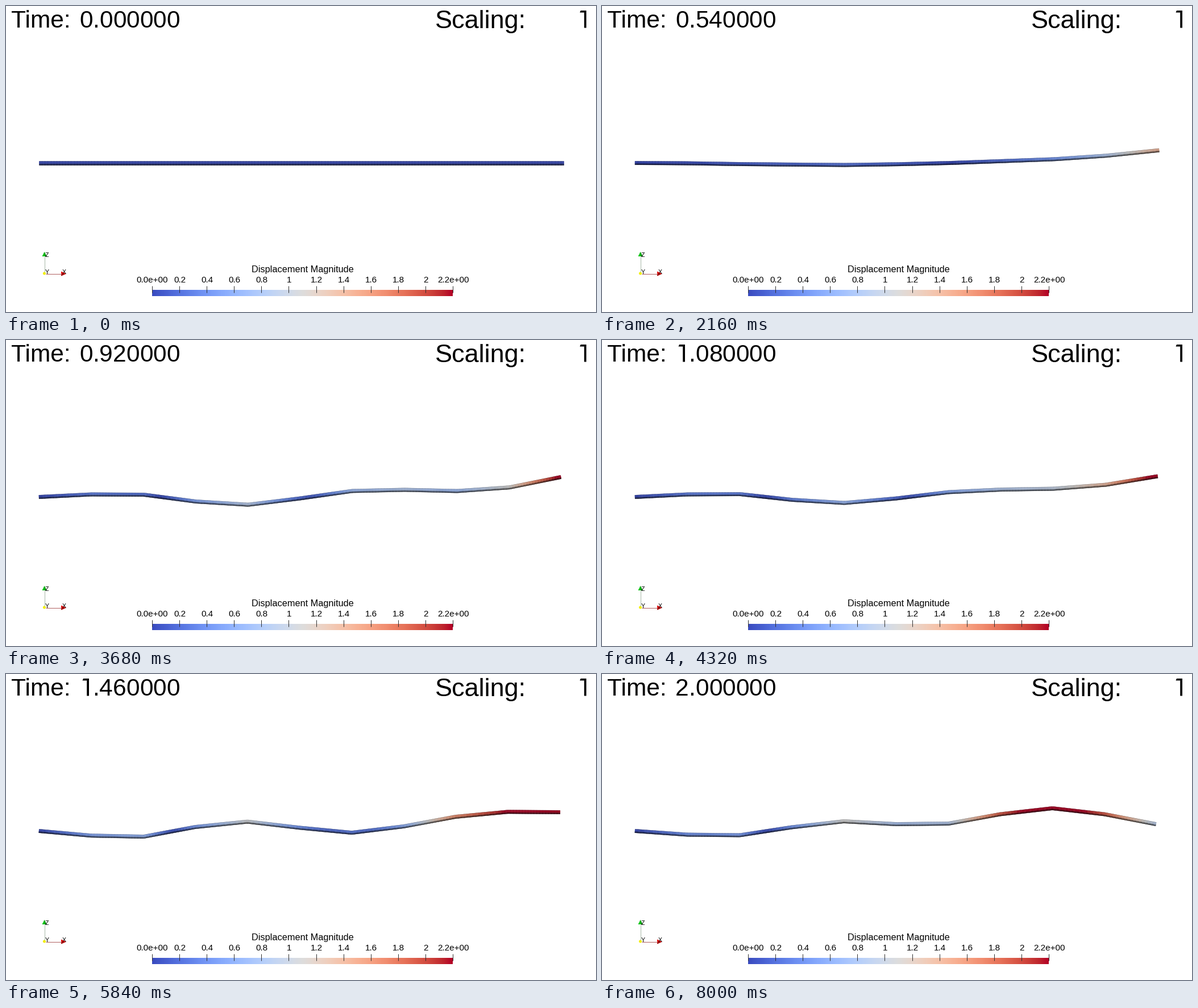
Write a matplotlib script that moves like this. It is 1038 px wide and 539 px high and loops after 8080 ms.

```python
import numpy as np
import matplotlib.pyplot as plt
from matplotlib.animation import FuncAnimation
from matplotlib.collections import PolyCollection
from matplotlib.patches import Circle, Polygon

W, H, DPI = 1038, 539, 64
PX = 72 / DPI          # points per pixel
FRAMES, INTERVAL, DT = 101, 80, 0.02
FONT = "Liberation Sans"

# Beam geometry in pixels
X0, Y0, LENGTH = 58, 276.5, 923
ELEMENTS, PARTS = 10, 18
STEP = LENGTH / ELEMENTS
UNIT = LENGTH / 60     # pixels per unit of displacement
VMAX = 2.2
SHADES = np.array([0.65, 0.84, 0.86, 0.79, 0.67, 0.48, 0.25])
EDGES = np.linspace(-3.2, 3.2, len(SHADES) + 1)

# Node deflections (pixels, downwards) at a few moments
TIMES = np.array([0, 0.32, 0.74, 1.08, 1.26, 1.68, 2.0])
POSES = np.array([
    [0, 0, 0, 0, 0, 0, 0, 0, 0, 0, 0],
    [0, 0.8, 0.5, -3, -2.5, 3.5, 7, 1.5, -6.5, -11, -11.5],
    [0, -0.5, 2, 8, 9.5, 0.8, -7.5, -8.5, -7, -14, -31],
    [0, -4.5, -5, 5, 10.5, 2.5, -8.5, -13, -14.5, -21.5, -36.5],
    [0, 6, 8, -2.5, -8.5, -2.5, 3, -6, -19.5, -31, -35.5],
    [0, 6, 6.5, -8.5, -17, -8, -4, -16.5, -31, -32, -27.5],
    [0, 6.5, 7.5, -6.5, -17, -12, -13, -29.5, -40, -29.5, -12],
])
RATES = np.gradient(POSES, TIMES, axis=0)
RATES[0] = 0

fig = plt.figure(figsize=(W / DPI, H / DPI), dpi=DPI, facecolor="white")
ax = fig.add_axes([0, 0, 1, 1])
ax.set_axis_off()
cmap = plt.get_cmap("coolwarm")


def label(x, y, s, size, ha="left"):
    return ax.text(x, y, s, fontsize=size * PX, family=FONT, color="black",
                   ha=ha, va="baseline")


def line(x, y, color, width=1):
    ax.plot(x, y, color=color, lw=width * PX, solid_capstyle="butt")


def plain_one(x, y):
    """A footless figure one whose stem ends at x, standing on y."""
    pts = [(x, y), (x, y - 30.5), (x - 10, y - 30.5), (x - 11.5, y - 27),
           (x - 3.8, y - 27), (x - 3.8, y)]
    return ax.add_patch(Polygon(pts, fc="black", ec="none"))


def deflection(t):
    """Cubic Hermite interpolation of the node deflections."""
    k = min(np.searchsorted(TIMES, t, side="right") - 1, len(TIMES) - 2)
    h = TIMES[k + 1] - TIMES[k]
    s = (t - TIMES[k]) / h
    return ((1 + 2 * s) * (1 - s) ** 2 * POSES[k]
            + s * (1 - s) ** 2 * h * RATES[k]
            + s * s * (3 - 2 * s) * POSES[k + 1]
            + s * s * (s - 1) * h * RATES[k + 1])


def beam(t):
    """Quads and colours of the tube, one straight piece per element."""
    v = deflection(t)
    dy = np.diff(v)
    dx = np.sqrt(STEP ** 2 - dy ** 2)      # elements keep their length
    x = X0 + np.concatenate([[0], np.cumsum(dx)])
    u = x - (X0 + STEP * np.arange(ELEMENTS + 1))
    quads, colors = [], []
    s = np.linspace(0, 1, PARTS + 1)
    for i in range(ELEMENTS):
        px = x[i] + s * dx[i]
        py = Y0 + v[i] + s * dy[i]
        nx, ny = -dy[i] / STEP, dx[i] / STEP
        mid = (s[1:] + s[:-1]) / 2
        mag = np.hypot(u[i] + mid * (u[i + 1] - u[i]), v[i] + mid * dy[i])
        base = cmap(mag / UNIT / VMAX)[:, :3]
        for a, b, shade in zip(EDGES[:-1], EDGES[1:], SHADES):
            top = np.stack([px + a * nx, py + a * ny], axis=1)
            low = np.stack([px + b * nx, py + b * ny], axis=1)
            quads.append(np.stack([top[:-1], top[1:], low[1:], low[:-1]], axis=1))
            colors.append(base * shade)
    return np.concatenate(quads), np.concatenate(colors)


# Headings
label(9.5, 38.5, "Time:", 42.5)
label(754.5, 38.5, "Scaling:", 45)
plain_one(1021, 38.5)

# Counter cells: one digit, the point, six digits
DIGIT, POINT = 23.6, 11.8
cells = []
left = 129
for n in range(8):
    width = POINT if n == 1 else DIGIT
    cells.append((label(left + width / 2, 38.5, "", 42.5, "center"),
                  plain_one(left + 17, 38.5)))
    left += width

# Colour legend
BAR_L, BAR_R = 257, 786
ax.imshow(np.linspace(0, 1, 256)[None, :], cmap=cmap, aspect="auto",
          extent=(BAR_L, BAR_R, 511.5, 500.5), interpolation="bilinear")
label(522, 468.5, "Displacement Magnitude", 16.3, "center")
for n in range(12):
    x = BAR_L + (BAR_R - BAR_L) * n / 11
    text = {0: "0.0e+00", 11: "2.2e+00"}.get(n, f"{n * 0.2:.1g}" if n < 5 else f"{round(n * 0.2, 1):g}")
    line([x, x], [493, 505], "#303030")
    label(x + 0.5, 487.3, text, 15.2, "center")

# Orientation axes
line([67.5, 67.5], [441, 469], "#a9b8a9")
line([70, 98], [471.5, 471.5], "#b06060")
ax.add_patch(Polygon([(67.5, 433), (63.5, 441), (71.5, 441)], fc="#12c41c", ec="none"))
ax.add_patch(Polygon([(67.5, 433), (68.5, 441), (71.5, 441)], fc="#0a8a12", ec="none"))
ax.add_patch(Polygon([(106, 471.5), (97, 467.5), (97, 475.5)], fc="#e01010", ec="none"))
ax.add_patch(Polygon([(106, 471.5), (97, 472.5), (97, 475.5)], fc="#9c0a0a", ec="none"))
ax.add_patch(Circle((67.5, 471), 2.6, fc="#f2ee10", ec="none"))
for x, y, s in [(72, 441.5, "Z"), (72, 472, "Y"), (102.5, 472, "X")]:
    label(x, y, s, 10.5, "center")

tube = PolyCollection([], linewidths=0.5 * PX)
ax.add_collection(tube, autolim=False)
ax.set_xlim(0, W)
ax.set_ylim(H, 0)


def update(i):
    t = i * DT
    quads, colors = beam(t)
    tube.set_verts(quads)
    tube.set_facecolor(colors)
    tube.set_edgecolor(colors)
    for (text, one), ch in zip(cells, f"{t:.6f}"):
        text.set_text("" if ch == "1" else ch)
        one.set_visible(ch == "1")
    return [tube]


anim = FuncAnimation(fig, update, frames=FRAMES, interval=INTERVAL,
                     repeat=True, repeat_delay=0, blit=False)
plt.show()
```
